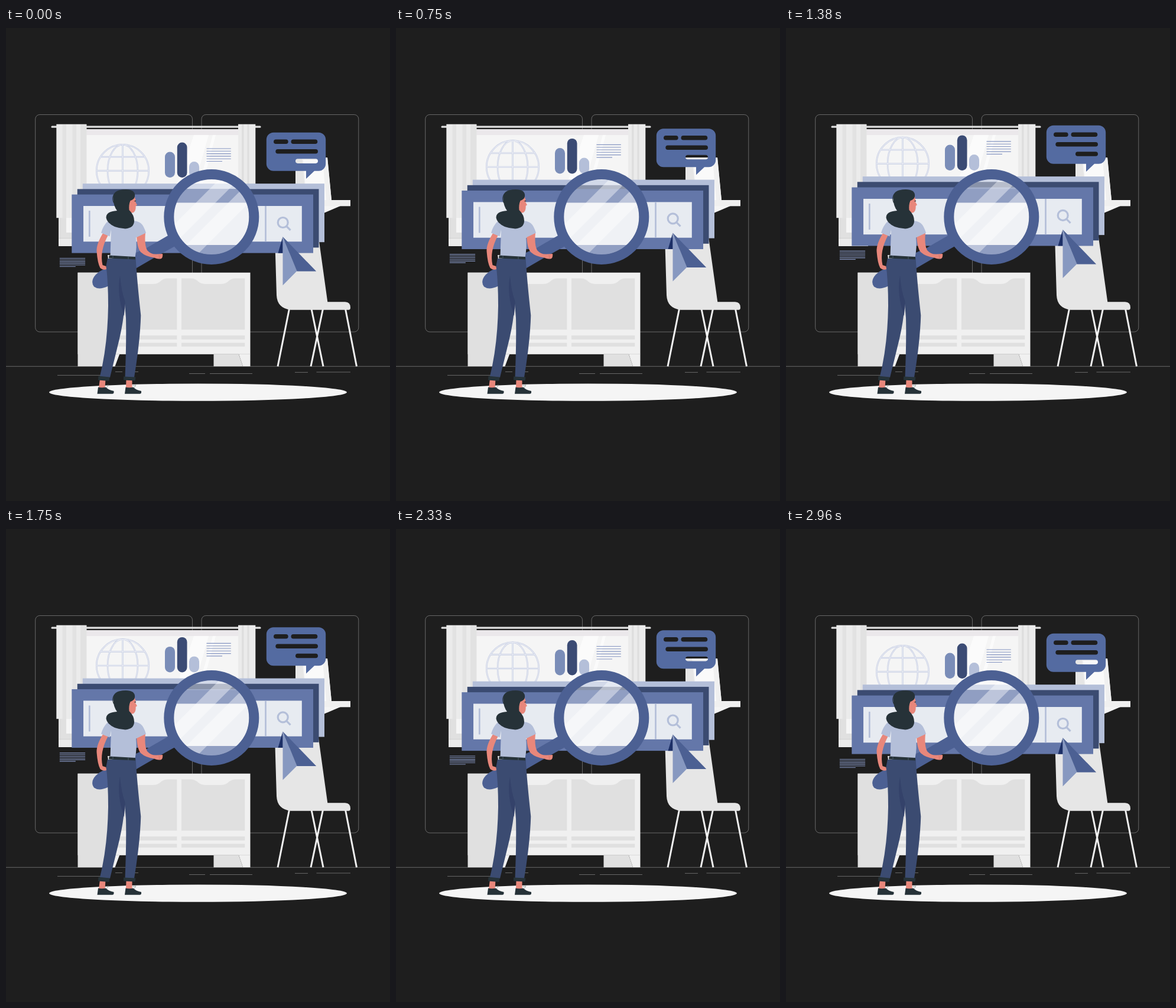
An HTML page that plays this animation: 650 by 800 pixels, repeating every 3 s.

```html
<!DOCTYPE html>
<html lang="en">
<head>
<meta charset="utf-8">
<title>Search illustration</title>
<style>
  html, body { margin: 0; width: 100%; height: 100%; overflow: hidden; background: #1e1e1e; }
  svg { display: block; width: 650px; height: 800px; }
</style>
</head>
<body>
<svg viewBox="0 0 650 800">
  <defs>
    <clipPath id="lens"><circle cx="347.8" cy="319.5" r="64"/></clipPath>
  </defs>

  <!-- Wall panels, floor and rug -->
  <g fill="none" stroke="#ebebeb" stroke-width=".36">
    <rect x="49.7" y="146.5" width="265.8" height="367.5" rx="7.4"/>
    <rect x="331" y="146.5" width="265.8" height="367.5" rx="7.4"/>
    <path d="M0 572.3H650"/>
    <path d="M87 587.4H171M185 581.5H197M212 581.5H224M310 584.5H337M345 584.5H417M489 582.4H511M525.5 582H583"/>
  </g>
  <ellipse cx="325" cy="616.1" rx="252" ry="14.7" fill="#f5f5f5"/>

  <!-- Window -->
  <g>
    <rect x="89" y="315" width="50" height="54" fill="#e0e0e0"/>
    <rect x="89" y="356" width="50" height="13" fill="#ebebeb"/>
    <path d="M89 355.8H139" stroke="#c7c7c7" stroke-width=".6"/>
    <rect x="102" y="318" width="34" height="28" fill="#f5f5f5"/>
    <rect x="134" y="171.3" width="260" height="150" fill="#f5f5f5"/>
    <rect x="134" y="171.3" width="260" height="9.8" fill="#ebe8eb"/>
    <path d="M318 181H343L312 290H280ZM350 181H355L326 290H320Z" fill="#fbfbfb"/>
    <rect x="76.5" y="165.5" width="355" height="3.3" rx="1.5" fill="#e0e0e0"/>
    <rect x="85.3" y="162.7" width="51" height="158.5" fill="#ebebeb"/>
    <path d="M95.5 163H102V321H95.5ZM112.5 163H119V321H112.5ZM126 163H136.3V321H126Z" fill="#e2e2e2"/>
    <rect x="393" y="162.7" width="29.3" height="158.5" fill="#ebebeb"/>
    <path d="M399 163H402.5V321H399ZM408.5 163H411.5V321H408.5Z" fill="#dedede"/>
  </g>

  <!-- Cabinet -->
  <g>
    <rect x="121.5" y="413.7" width="292" height="138.1" fill="#f0f0f0"/>
    <path d="M121.5 413.7H177V551.8H192L184 572.3H121.5Z" fill="#e0e0e0"/>
    <path d="M184 551.8H192L184.5 572.3H178Z" fill="#f0f0f0"/>
    <path d="M351.5 551.8H394L401 572.3H351.5Z" fill="#e0e0e0"/>
    <path d="M394 551.5H413.5V572.3H401Z" fill="#f0f0f0"/>
    <g id="doors" fill="#e0e0e0"></g>
  </g>

  <!-- Desk corner, laptop, chair -->
  <path d="M538 301H566L538 313Z" fill="#f5f5f5"/>
  <path d="M490 219H544L551 291H490Z" fill="#e6e6e6"/>
  <path d="M501 219H544L551 291H508Z" fill="#f0f0f0"/>
  <path d="M503 223H536L542 291H509Z" fill="#fafafa"/>
  <rect x="530" y="291" width="53" height="10.3" fill="#f0f0f0"/>
  <path d="M479.5 475L460 572.3M517 475L537 572.3M536.5 475L516 572.3M574.5 475L593.5 572.3" stroke="#f0f0f0" stroke-width="3"/>
  <path d="M455 350H528.5L544.3 463.3H574Q583 463.5 583 473Q583 476.7 580 476.7H482Q459 474 458 452Z" fill="#e6e6e6"/>

  <!-- Floating parts -->
  <g id="floating">
    <g id="globe" fill="none"></g>
    <rect x="269" y="209.5" width="17" height="43.5" rx="8.5" fill="#7a8db8"/>
    <rect x="289.8" y="193.5" width="16.7" height="59.5" rx="8.3" fill="#3b4b74"/>
    <rect x="310" y="226" width="17" height="27" rx="8.5" fill="#b4bfd9"/>
    <path id="notes" stroke="#8696c2" stroke-width="1.1"/>
    <path id="bubble" fill="#546ba1" fill-rule="evenodd"/>
    <rect x="129.8" y="263.2" width="409.2" height="99" fill="#b4bfd9"/>
    <rect x="120.7" y="272.4" width="408.8" height="99" fill="#3b4b71"/>
    <rect x="111.3" y="281.6" width="408.7" height="99" fill="#6477a9"/>
    <rect x="131" y="301" width="369.8" height="60.3" fill="#e7ebf1"/>
    <path d="M141.3 309V353M439.5 301V361.3" stroke="#b4bfd9" stroke-width="2.7"/>
    <g fill="none" stroke="#b4bfd9" stroke-width="3.2">
      <circle cx="468.7" cy="329" r="8.5"/>
      <path d="M475 335.5L481.5 342"/>
    </g>
    <path d="M468.5 353L460.5 380.7H468.5Z" fill="#1c2f66"/>
    <path d="M468.5 353L492.5 411L468.5 435.2Z" fill="#8798c0"/>
    <path d="M468.5 353L525.2 411.6H492.5Z" fill="#4c6093"/>
  </g>

  <!-- Magnifier -->
  <path d="M276 350L288 368Q262 382 221 406L172 437Q157 443.5 149 437.5Q142 428 152 417L158 412Q200 388 238 372Z" fill="#4c6093"/>
  <g clip-path="url(#lens)">
    <rect x="280" y="250" width="136" height="140" fill="#fff" opacity=".4"/>
    <rect x="280" y="272.3" width="136" height="120" fill="#909ec2"/>
    <rect x="280" y="295.5" width="136" height="71.5" fill="#eff1f5"/>
    <path d="M367 250H400L260 390H227ZM422 250H457L317 390H282Z" fill="#fff" opacity=".4"/>
  </g>
  <circle cx="347.8" cy="319.5" r="72" fill="none" stroke="#4c6093" stroke-width="17"/>

  <!-- Woman -->
  <g>
    <path d="M159 594H168.5L167.5 609H157ZM203.5 594H213.5L213.5 609H203Z" fill="#e8877b"/>
    <path id="shoe" d="M156 607.5Q162 609 169 607.5Q174 612.5 182.5 614V617Q182 618.7 180 618.7H154.5Z" fill="#263238"/>
    <use href="#shoe" x="46.5"/>
    <path d="M167.5 605L173.5 604L170 609M214 605L220 604L216.5 609" fill="none" stroke="#8b9799" stroke-width=".8"/>
    <path d="M172 389H219.5Q222 430 228.3 486Q227 530 217 591H201.5Q204 530 203 490L201 466Q199 500 188 542L176 591H158.5Q172 538 173 470Q173 430 169.5 402Z" fill="#3b4b71"/>
    <path d="M193 419Q187 448 199.5 487Q202 470 201.5 462Q195 445 193 419Z" fill="#34426a"/>
    <path d="M156.5 588.5L175.5 590.5L174.5 597L156 595.5ZM199 589.5L219.5 590.5L218.5 596.5L199 595.5Z" fill="#263238"/>
    <path d="M166 344Q152.5 365 153.5 378Q155 398 159.5 406Q164 410 170 408L169.5 403L163.5 401Q158 378 173 350Z" fill="#e8877b"/>
    <path d="M221 351Q222 372 228 379Q237 387 251 388.5Q257 391.5 263 390Q266 387 265 382L255 382.5Q246 383.5 239 376Q234 367 236 346Z" fill="#e8877b"/>
    <path d="M259 383L260 390" stroke="#ce6f64" stroke-width=".7"/>
    <path d="M172 384L180 384V390H173Z" fill="#f0f0f0"/>
    <path d="M172 327Q164 335 161 346.5L175.5 352.5L178 341Q177 370 176.5 386L218.5 388Q222 370 220 354.5L237 346.5Q233 334 228 330Q222 326 214 326Z" fill="#b4bfd9"/>
    <path d="M174.5 384.5L219 387V391.5L174 389.5Z" fill="#263238"/>
    <path d="M181 385V389.5M207 386.5V391" stroke="#56667a" stroke-width=".8"/>
    <path d="M207 288L217 284Q219.5 288 219.5 295L222 299.3L219.7 300.7Q220 309 216 312Q211 313.5 208 311Z" fill="#e8877b"/>
    <path d="M217.5 292.8L220 292.3" stroke="#263238" stroke-width="1.3"/>
    <path d="M181.5 289Q180 278 191 274.5Q207 271 215 276Q220 281 217 288Q214 291 210.5 292Q207.500 299 208.500 308Q217 316 217 326Q217 338 202 339.500Q192 339 184 336Q171 330 169.500 321Q169 310 188 309Q182 301 181.500 289Z" fill="#263238"/>
    <path d="M183 281Q178.500 288 182.500 296" fill="none" stroke="#263238" stroke-width="1"/>
  </g>
</svg>
<script>
  const FPS = 24, LOOP = 3000, LAST_STEP = 71, RISE = 13;
  const get = id => document.getElementById(id);

  const roundRect = (x, y, w, h, r) =>
    `M${x + r} ${y}h${w - 2 * r}a${r} ${r} 0 0 1 ${r} ${r}v${h - 2 * r}a${r} ${r} 0 0 1 ${-r} ${r}` +
    `h${2 * r - w}a${r} ${r} 0 0 1 ${-r} ${-r}v${2 * r - h}a${r} ${r} 0 0 1 ${r} ${-r}z`;

  const textLines = (x, y, gap, width, lastWidth, count = 6) =>
    Array.from({ length: count }, (_, i) =>
      `M${x} ${y + i * gap}h${i < count - 1 ? width : lastWidth}`).join('');

  const rect = (x, y, w, h) => `<rect x="${x}" y="${y}" width="${w}" height="${h}"/>`;

  const door = (x, w) => {
    const mid = x + w / 2;
    return rect(x, 423.5, w, 86.7) + rect(x, 520, w, 6.8) + rect(x, 532.5, w, 6.3) +
      `<path fill="#f0f0f0" d="M${mid - 37} 423Q${mid - 30} 424 ${mid - 25} 429Q${mid - 20} 433 ${mid - 13} 433` +
      `H${mid + 13}Q${mid + 20} 433 ${mid + 25} 429Q${mid + 30} 424 ${mid + 37} 423Z"/>`;
  };
  get('doors').innerHTML = door(182, 107.3) + door(297, 107.3);

  const globeShape = (color, width) =>
    `<g stroke="${color}" stroke-width="${width}"><circle cx="197.5" cy="241.5" r="44.3"/>` +
    `<ellipse cx="197.5" cy="241.5" rx="25.5" ry="44.3"/>` +
    `<path d="M197.5 197V286M160 218H235M153 241.5H242M160 265H235"/></g>`;
  get('globe').innerHTML = globeShape('#c2cae1', 2.5) + globeShape('#eceef5', 1.1);

  get('notes').setAttribute('d',
    textLines(339.5, 204, 4.3, 41.3, 26.5) + textLines(90.8, 389.5, 2.8, 43.3, 27));

  // The slots are cut out, so the scene behind shows through.
  get('bubble').setAttribute('d',
    roundRect(440.8, 176.8, 100.4, 65, 12) + 'M508 241.8V255L522 241.8Z' +
    roundRect(453, 188.5, 24.7, 7.6, 3.8) + roundRect(482.5, 188.5, 44.8, 7.6, 3.8) +
    roundRect(456.3, 205, 71.7, 7.6, 3.8) + roundRect(490, 221.3, 38, 7.6, 3.8));

  function draw(time) {
    const step = Math.floor(time * FPS / 1000 + 0.13);
    const phase = Math.min(step / LAST_STEP, 1);
    const lift = RISE * (1 - Math.abs(2 * phase - 1));
    get('floating').setAttribute('transform', `translate(0 ${-lift.toFixed(3)})`);
  }

  const start = performance.now();
  function tick() {
    draw((performance.now() - start) % LOOP);
    requestAnimationFrame(tick);
  }
  tick();
</script>
</body>
</html>
```
